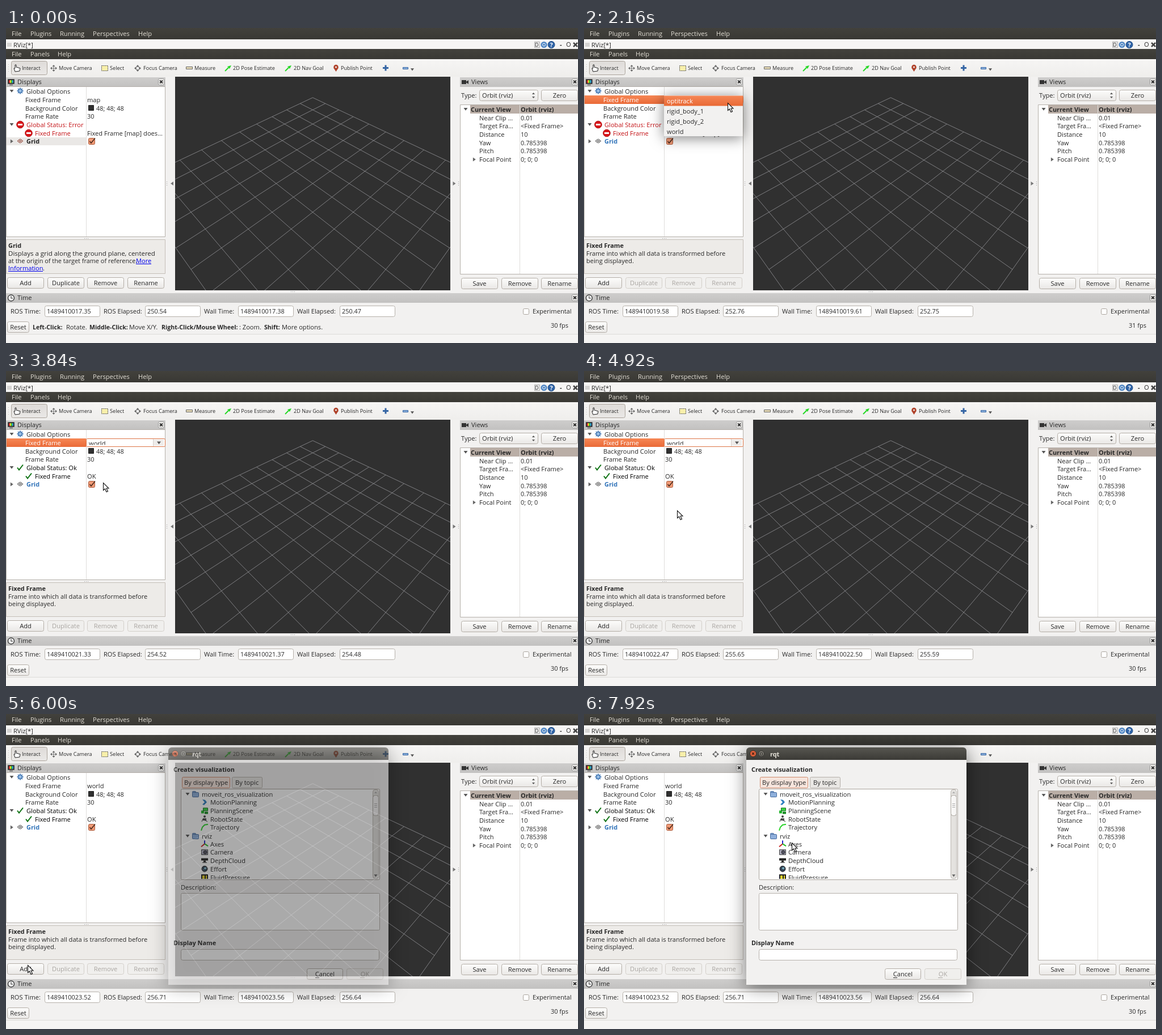
An HTML page with a canvas that plays this animation: 1008x556 px, repeating every 8 s.

```html
<!DOCTYPE html>
<html lang="en">
<head>
<meta charset="utf-8">
<title>RViz fixed frame</title>
<style>
html, body { margin: 0; width: 100%; height: 100%; overflow: hidden; background: #f2f1f0; }
canvas { display: block; }
</style>
</head>
<body>
<canvas id="stage" width="1008" height="556"></canvas>
<script>
const LOOP = 8000, STEP = 120;
const SELECT = 1080, POPUP = 1920, PICK = 3600, STATUS_OK = 3720, ADD = 5760, DIALOG = 6000;
const FAMILY = '"Open Sans", "Noto Sans", sans-serif';
const REG = `11.1px ${FAMILY}`, BOLD = `bold 10.9px ${FAMILY}`, HINT = `bold 10.6px ${FAMILY}`;
const SLIM = `10.9px ${FAMILY}`, SMALL = `9.15px ${FAMILY}`, NOTE = `11.5px ${FAMILY}`;
const INK = '#282828', PANEL = '#f2f1f0', EDGE = '#b5b0aa', BLUE = '#3465a4';

const stage = document.getElementById('stage').getContext('2d');
let g = stage;

// time, x, y of the pointer tip
const POINTER = [
  [120, 916, 320], [840, 200, 200], [1200, 155, 127], [1440, 155, 127], [1800, 269, 126],
  [2040, 269, 126], [2520, 205, 148], [3000, 184, 169], [3360, 176, 179], [3600, 174, 180],
  [4320, 165, 232], [4920, 164, 246], [5520, 38, 443], [6120, 38, 443], [6720, 385, 143],
  [6960, 387, 147], [7200, 396, 168], [7680, 374, 213], [7920, 366, 227]
];
// time, ROS time, ROS elapsed, wall time, wall elapsed (seconds)
const CLOCK = [
  [0, 17.35, 250.54, 17.38, 250.47], [1320, 18.71, 251.89, 18.74, 251.89],
  [3000, 20.45, 253.64, 20.49, 253.61], [4920, 22.47, 255.65, 22.50, 255.59],
  [6000, 23.52, 256.71, 23.56, 256.64]
];

function sample(keys, t) {
  const next = keys.findIndex(k => k[0] > t);
  if (next < 0) return keys.at(-1).slice(1);
  if (next === 0) return keys[0].slice(1);
  const a = keys[next - 1], b = keys[next], p = (t - a[0]) / (b[0] - a[0]);
  return a.slice(1).map((v, i) => v + (b[i + 1] - v) * p);
}

function text(s, x, y, color = INK, font = REG) {
  g.fillStyle = color;
  g.font = font;
  g.fillText(s, x, y);
}

function rect(x, y, w, h, fill) {
  g.fillStyle = fill;
  g.fillRect(x, y, w, h);
}

function shade(y, h, top, bottom) {
  const paint = g.createLinearGradient(0, y, 0, y + h);
  paint.addColorStop(0, top);
  paint.addColorStop(1, bottom);
  return paint;
}

function box(x, y, w, h, fill = '#fff', edge = EDGE, radius = 0) {
  g.beginPath();
  g.roundRect(x + .5, y + .5, w - 1, h - 1, radius);
  g.fillStyle = fill;
  g.fill();
  g.strokeStyle = edge;
  g.lineWidth = 1;
  g.stroke();
}

function poly(points, fill, stroke, width = 1) {
  g.beginPath();
  for (let i = 0; i < points.length; i += 2) g.lineTo(points[i], points[i + 1]);
  if (fill) { g.closePath(); g.fillStyle = fill; g.fill(); }
  if (stroke) { g.strokeStyle = stroke; g.lineWidth = width; g.stroke(); }
}

function disc(x, y, r, fill, stroke, width = 1) {
  g.beginPath();
  g.arc(x, y, r, 0, 7);
  if (fill) { g.fillStyle = fill; g.fill(); }
  if (stroke) { g.strokeStyle = stroke; g.lineWidth = width; g.stroke(); }
}

function button(label, x, y, w, h = 20, enabled = true) {
  box(x, y, w, h, enabled ? shade(y, h, '#fdfdfc', '#e9e7e5') : '#f0efed', enabled ? '#b3ada6' : '#d3cfca', 3);
  g.textAlign = 'center';
  text(label, x + w / 2, y + h / 2 + 4, enabled ? INK : '#aaa6a2');
  g.textAlign = 'left';
}

function down(x, y, s = 3.5, color = '#555') { poly([x - s, y - s * .6, x + s, y - s * .6, x, y + s * .8], color); }
function right(x, y, s = 3.5, color = '#666') { poly([x - s * .6, y - s, x - s * .6, y + s, x + s * .8, y], color); }
function check(x, y) { poly([x - 5, y, x - 2, y + 4, x + 5, y - 5], null, '#0f7314', 2); }

function closeBox(x, y) {
  box(x - 5, y - 6, 11, 12, '#efeeec', '#999', 2);
  poly([x - 2, y - 2.5, x + 3, y + 2.5], null, '#333', 2);
  poly([x + 3, y - 2.5, x - 2, y + 2.5], null, '#333', 2);
}

function header(label, x, y, w, textX) {
  rect(x, y, w, 17, shade(y, 17, '#cecdcc', '#c2c1c0'));
  text(label, textX, y + 12);
}

function menu(y, h, baseline, items) {
  rect(0, y, 1008, h, shade(y, h, '#42413c', '#393834'));
  for (const [label, x] of items) text(label, x, baseline, '#e3dfd6');
}

function crossArrows(x, y) {
  poly([x - 5, y, x + 5, y], null, '#777');
  poly([x, y - 5, x, y + 5], null, '#777');
  for (const d of [-1, 1]) {
    poly([x + 6 * d, y, x + 3 * d, y - 2.5, x + 3 * d, y + 2.5], '#666');
    poly([x, y + 6 * d, x - 2.5, y + 3 * d, x + 2.5, y + 3 * d], '#666');
  }
}

function toolbar() {
  rect(0, 55, 1008, 31, shade(55, 31, '#f6f5f4', '#efeeec'));
  for (let y = 64; y < 78; y += 4) rect(4, y, 1, 1, '#bbb');
  box(9, 58, 64, 25, shade(58, 25, '#dedbd8', '#ebe9e7'), '#aaa39b', 3);
  poly([14, 71, 16, 71, 16, 65, 18, 65, 18, 69, 25, 71, 24, 76, 16, 77, 14, 71], '#fff', '#222');
  crossArrows(84, 71);
  g.setLineDash([2, 1]);
  box(168, 66, 12, 10, '#f8efaa', '#555');
  g.setLineDash([]);
  crossArrows(232, 71);
  disc(232, 71, 3, '#f2f1f0', '#777');
  box(317, 68, 12, 5, '#e5d9b5', '#666');
  for (const x of [386, 492]) {
    poly([x, 76, x + 6, 70], null, '#25d825', 2);
    poly([x + 11, 66, x + 4, 68, x + 8, 72], '#25d825');
  }
  poly([577, 70, 586, 70, 581.5, 77], '#b0432b');
  disc(581.5, 69, 4.2, '#b0432b');
  disc(581.5, 69, 1.5, '#eee');
  rect(664, 69, 10, 3, BLUE);
  rect(667.5, 65.5, 3, 10, BLUE);
  box(699, 69, 10, 4, '#8fb2dc', BLUE);
  down(716, 73, 3);
  const labels = [['Interact', 28], ['Move Camera', 93], ['Select', 183], ['Focus Camera', 242], ['Measure', 332],
    ['2D Pose Estimate', 400], ['2D Nav Goal', 507], ['Publish Point', 590]];
  for (const [label, x] of labels) text(label, x, 74, INK, SMALL);
}

function windowBars() {
  menu(0, 20, 14, [['File', 10], ['Plugins', 43], ['Running', 95], ['Perspectives', 153], ['Help', 233]]);
  rect(0, 20, 1008, 17, '#f6f5f4');
  rect(2, 26, 8, 7, '#d5d4d3');
  text('RViz[*]', 13, 33.5);
  box(931, 24, 10, 11, '#eee', '#aaa');
  text('D', 932, 33, INK, SMALL);
  disc(948, 29.5, 5.5, '#4f86c4');
  disc(948, 29.5, 2.5, null, '#fff');
  disc(961, 29.5, 6, '#2f64a8', '#1f4a80');
  text('?', 958.5, 33.5, '#fff', BOLD);
  text('-', 976, 33, INK, BOLD);
  text('O', 987, 33);
  poly([1000, 26, 1007, 33], null, '#444', 2.5);
  poly([1007, 26, 1000, 33], null, '#444', 2.5);
  menu(37, 18, 50, [['File', 10], ['Panels', 43], ['Help', 91]]);
  toolbar();
}

function view3d() {
  g.save();
  g.beginPath();
  g.rect(298, 86, 485, 377);
  g.clip();
  rect(298, 86, 485, 377, '#303030');
  const project = (i, j) => {
    const away = (i + j) / 2, scale = 455 / (10 + away);
    return [540.5 + (i - j) * Math.SQRT1_2 * scale, 274.5 - away * scale];
  };
  for (let i = -5; i <= 5; i++) {
    poly([...project(i, -5), ...project(i, 5)], null, 'rgba(160,160,164,.7)');
    poly([...project(-5, i), ...project(5, i)], null, 'rgba(160,160,164,.7)');
  }
  g.restore();
  poly([290, 274.5, 295, 271, 295, 278], '#777');
  poly([792.5, 274.5, 787.5, 271, 787.5, 278], '#777');
  for (let i = 0; i < 3; i++) {
    rect(283, 271 + i * 3, 1, 1, '#999');
    rect(797, 271 + i * 3, 1, 1, '#999');
    rect(138 + i * 3, 371, 1, 1, '#999');
    rect(502 + i * 3, 465, 1, 1, '#999');
  }
}

function statusIcon(x, y, ok) {
  if (ok) return check(x, y);
  disc(x, y, 6.3, '#d8181c', '#b01014');
  rect(x - 4, y - 1.5, 8, 3, '#fff');
}

function displays(t) {
  const picked = t >= SELECT, editing = picked && t < ADD, ok = t >= STATUS_OK;
  const frame = t < PICK ? 'map' : 'world', statusInk = ok ? '#000' : '#c41216';
  header('Displays', 0, 87, 281, 20);
  box(3, 90, 12, 9, '#222', '#555');
  ['#d33', '#dd3', '#3b3', '#39d'].forEach((c, i) => rect(5 + i * 2, 92, 2, 5, c));
  rect(6, 100, 6, 1, '#333');
  closeBox(273, 95);
  box(0, 103, 281, 266);
  if (!picked) rect(1, 193, 140, 14, '#eae8e6');
  rect(141, 104, 1, 264, '#dedddb');

  down(10, 111);
  for (let i = 0; i < 4; i++) {
    const a = i * Math.PI / 4, x = Math.cos(a) * 5.5, y = Math.sin(a) * 5.5;
    poly([25 - x, 111 - y, 25 + x, 111 + y], null, '#4d7fb8', 2);
  }
  disc(25, 111, 3.2, '#9cc0e6', '#4d7fb8', 1.5);
  text('Global Options', 36, 115.5);
  if (editing) rect(1, 119, 140, 15, shade(119, 15, '#f68755', '#ea6a38'));
  text('Fixed Frame', 34, 130.5, editing ? '#fff' : INK);
  if (editing) {
    box(141, 119, 140, 15, '#fff', '#dc7446', 2);
    g.save();
    g.beginPath();
    g.rect(143, 121, 117, 9.5);
    g.clip();
    text(frame, 146, 131.5);
    if (t < PICK && (t / 500 | 0) % 2 === 0) rect(169, 121, 1, 11, INK);
    g.restore();
    rect(260, 121, 18, 11, '#eeecea');
    rect(259, 120, 1, 13, '#d5d0cb');
    down(269.5, 126.5);
  } else text(frame, 143, 130.5);
  text('Background Color', 34, 145.5);
  box(145, 136, 10, 10, '#303030', '#222');
  text('48; 48; 48', 159, 145.5, INK, SLIM);
  text('Frame Rate', 34, 160);
  text('30', 143, 160, INK, SLIM);

  down(10, 170);
  statusIcon(25, 170.5, ok);
  text('Global Status: ' + (ok ? 'Ok' : 'Error'), 36, 174.5, statusInk);
  statusIcon(40, 185.5, ok);
  text('Fixed Frame', 51, 189.5, statusInk);
  text(ok ? 'OK' : 'Fixed Frame [map] does…', 143, 189.5);
  right(10, 200);
  const mesh = picked ? '#444' : '#8c3a2a';
  poly([20, 199.5, 25, 196, 30, 199.5, 25, 203, 20, 199.5], null, mesh);
  poly([22.5, 197.7, 27.5, 201.3], null, mesh);
  poly([27.5, 197.7, 22.5, 201.3], null, mesh);
  text('Grid', 36, 204, picked ? '#2f72b8' : '#222', BOLD);
  box(145, 194, 12, 12, '#f09a76', '#a8593a', 2);
  poly([147.5, 200, 150, 203, 157, 194.5], null, '#4a2a1c', 1.6);

  box(0, 373, 281, 61, '#edebe8', '#c4beb7');
  if (picked) {
    text('Fixed Frame', 4, 388, INK, BOLD);
    text('Frame into which all data is transformed before', 4, 401.5);
    text('being displayed.', 4, 415);
  } else {
    text('Grid', 4, 388, INK, BOLD);
    text('Displays a grid along the ground plane, centered', 4, 401.5, INK, NOTE);
    text('at the origin of the target frame of reference.', 4, 415, INK, SLIM);
    text('More', 229, 415, '#00e');
    text('Information', 4, 428, '#00e');
    text('.', 65, 428);
    rect(229, 416, 27, 1, '#00e');
    rect(4, 429, 61, 1, '#00e');
  }
  button('Add', 2, 440, 65);
  button('Duplicate', 73, 440, 65, 20, !picked);
  button('Remove', 143, 440, 65, 20, !picked);
  button('Rename', 214, 440, 65, 20, !picked);
}

function views() {
  header('Views', 800, 87, 208, 820);
  rect(803, 92, 8, 7, '#333');
  poly([810, 95.5, 815, 92, 815, 99], '#333');
  closeBox(1002, 95);
  text('Type:', 802, 123);
  button('', 834, 109, 104);
  text('Orbit (rviz)', 839, 123);
  poly([927, 117, 932, 117, 929.5, 114], '#555');
  poly([927, 121, 932, 121, 929.5, 124], '#555');
  button('Zero', 943, 109, 65);
  box(800, 135, 209, 300);
  rect(818, 136, 190, 15, '#baaea6');
  rect(905, 136, 1, 298, '#dedddb');
  down(810, 143);
  text('Current View', 819, 147.5, INK, BOLD);
  text('Orbit (rviz)', 907, 147.5, INK, BOLD);
  const rows = [['Near Clip …', '0.01'], ['Target Fra…', '<Fixed Frame>'], ['Distance', '10'],
    ['Yaw', '0.785398'], ['Pitch', '0.785398'], ['Focal Point', '0; 0; 0']];
  rows.forEach(([label, value], i) => {
    const y = 162.5 + i * 14.7;
    text(label, 834, y);
    text(value, 907, y, INK, i === 1 ? REG : SLIM);
  });
  right(825, 232);
  button('Save', 802, 441, 65);
  button('Remove', 873, 441, 65);
  button('Rename', 943, 441, 65);
}

function timePanel(t) {
  header('Time', 0, 468, 1008, 20);
  disc(9, 476.5, 5.5, '#eee', '#333', 1.3);
  poly([9, 473, 9, 477, 12, 477], null, '#333');
  closeBox(1002, 476);
  const fields = [['ROS Time:', 8, 68], ['ROS Elapsed:', 172, 245], ['Wall Time:', 349, 409], ['Wall Elapsed:', 513, 588]];
  const values = sample(CLOCK, t);
  fields.forEach(([label, x, fieldX], i) => {
    text(label, x, 503.5);
    box(fieldX, 490, 98, 20, '#fff', EDGE, 3);
    text((i % 2 ? '' : '14894100') + values[i].toFixed(2), fieldX + 4, 503.5, INK, SLIM);
  });
  box(911, 495, 11, 11, '#fff', '#a9a39c', 2);
  text('Experimental', 928, 503.5);
  button('Reset', 2, 518, 39);
  text((t >= 2160 && t < 2760 ? 31 : 30) + ' fps', 960, 528.5, INK, SLIM);
  if (t < 720) {
    const hints = [['Left-Click:', 47, 'Rotate.', 106], ['Middle-Click:', 147, 'Move X/Y.', 217],
      ['Right-Click/Mouse Wheel:', 274, ': Zoom.', 411], ['Shift:', 455, 'More options.', 486]];
    for (const [key, x, action, actionX] of hints) {
      text(key, x, 532, INK, HINT);
      text(action, actionX, 532);
    }
  }
  rect(0, 540, 1008, 1, '#dddbd8');
  rect(0, 541, 1008, 15, '#f5f4f3');
}

function popup(y) {
  g.save();
  g.shadowColor = 'rgba(0,0,0,.5)';
  g.shadowBlur = 24;
  g.shadowOffsetY = 3;
  rect(141, 119, 139, 72, PANEL);
  g.restore();
  const active = Math.min(3, Math.floor((y - 119) / 18));
  ['optitrack', 'rigid_body_1', 'rigid_body_2', 'world'].forEach((name, i) => {
    const top = 119.5 + i * 18;
    if (i === active) rect(141, top, 139, 18, shade(top, 18, '#f58655', '#e96935'));
    text(name, 146, top + 13, i === active ? '#fff' : INK);
  });
}

const ICONS = [
  (x, y) => poly([x - 4, y - 5, x + 1, y - 4, x + 4, y, x - 1, y + 5, x - 4, y + 4, x, y], '#2f7fc0'),
  (x, y) => { rect(x - 6, y, 5, 5, '#1fb52a'); box(x - 3, y - 5, 9, 6, '#39d545', '#126b18'); rect(x, y + 2, 6, 4, '#148a1e'); },
  (x, y) => { disc(x, y - 4, 2, '#444'); rect(x - 3, y - 1, 6, 4, '#555'); poly([x - 5, y + 5, x - 3, y, x + 5, y + 5], null, '#333'); },
  (x, y) => poly([x - 6, y + 6, x - 4, y, x, y - 4, x + 6, y - 5], null, '#2bd52b', 2),
  (x, y) => { poly([x, y, x, y - 6], null, '#22c', 2); poly([x, y, x - 6, y + 5], null, '#c22', 2); poly([x, y, x + 6, y + 4], null, '#2b2', 2); },
  (x, y) => { box(x - 6, y - 5, 12, 10, '#aab', '#444'); disc(x + 1, y, 3, '#556', '#222'); },
  (x, y) => { rect(x - 6, y - 4, 12, 4, '#222'); rect(x - 2, y, 4, 3, '#222'); rect(x - 4, y + 3, 8, 1, '#222'); },
  (x, y) => { disc(x, y, 5, '#345', '#222'); disc(x + 1, y - 1, 2, '#7ab'); },
  (x, y) => { rect(x - 6, y - 5, 12, 10, '#222'); rect(x - 4, y - 3, 4, 8, '#e8d52a'); rect(x + 2, y - 3, 2, 8, '#e8d52a'); }
];

function folder(name, y) {
  down(320, y);
  box(328, y - 5, 7, 4, '#8fb0dc', '#456a9c', 1);
  box(328, y - 3, 12, 9, '#8fb0dc', '#456a9c', 1);
  text(name, 345, y + 4.5);
}

function dialog() {
  g.beginPath();
  g.roundRect(286, 59, 388, 419, [6, 6, 0, 0]);
  g.clip();
  rect(286, 59, 388, 22, shade(59, 22, '#575650', '#3b3a36'));
  rect(286, 81, 388, 397, PANEL);
  disc(298, 70, 5.5, '#e5623a', '#3a2a22');
  poly([296, 68, 300, 72], null, '#4a2216', 1.5);
  poly([300, 68, 296, 72], null, '#4a2216', 1.5);
  disc(312.5, 70, 5, '#7b7972', '#33322e');
  box(310, 68, 5, 5, '#7b7972', '#33322e');
  text('rqt', 328, 74.5, '#e6e2d9', BOLD);
  text('Create visualization', 295, 102, INK, BOLD);
  box(310, 111, 85, 20, '#f6e5dd', '#d08a6c', 2);
  text('By display type', 314, 124.5);
  box(398, 111, 54, 20, '#e9e7e4', EDGE, 2);
  text('By topic', 404, 125);

  box(308, 132, 351, 161, '#fff', '#aaa49d', 2);
  g.save();
  g.beginPath();
  g.rect(309, 133, 337, 158);
  g.clip();
  folder('moveit_ros_visualization', 141);
  folder('rviz', 215);
  const names = ['MotionPlanning', 'PlanningScene', 'RobotState', 'Trajectory', 'Axes', 'Camera', 'DepthCloud', 'Effort', 'FluidPressure'];
  names.forEach((name, i) => {
    const y = 141 + (i + (i < 4 ? 1 : 2)) * 14.7;
    ICONS[i](350, y);
    text(name, 360, y + 4.5);
  });
  g.restore();
  box(646, 133, 11, 158, '#e4e2df', '#bdb8b2', 4);
  box(646, 143, 11, 37, '#f7f6f5', '#a9a49d', 4);
  for (const y of [158, 161, 164]) rect(649, y, 5, 1, '#aaa');
  poly([649, 140, 654, 140, 651.5, 137], '#aaa');
  down(651.5, 285, 3, '#666');

  text('Description:', 308, 309.5);
  box(308, 316, 351, 66, '#fff', EDGE, 2);
  text('Display Name', 295, 408, INK, BOLD);
  box(308, 415, 350, 20, '#fff', EDGE, 3);
  button('Cancel', 530, 449, 64);
  rect(545, 465, 7, 1, INK);
  button('OK', 600, 449, 65, 20, false);
  rect(624, 465, 8, 1, '#aaa6a2');
}

function layer(draw) {
  const canvas = document.createElement('canvas');
  canvas.width = 1008;
  canvas.height = 556;
  g = canvas.getContext('2d');
  draw();
  g = stage;
  return canvas;
}

function pointer(t, x, y) {
  if (t >= 1080 && t < 1680 && y < 134) {
    for (const [color, width] of [['#fff', 3], ['#111', 1.3]]) {
      poly([x + .5, y - 6, x + .5, y + 6], null, color, width);
      poly([x - 2.5, y - 6, x + 3.5, y - 6], null, color, width);
      poly([x - 2.5, y + 6, x + 3.5, y + 6], null, color, width);
    }
    return;
  }
  const arrow = [0, 0, 0, 13, 3, 10.5, 5.5, 16, 8, 15, 5.5, 9.5, 9.5, 9.5];
  poly([...arrow, 0, 0].map((v, i) => v + (i % 2 ? y : x) + .5), '#fff', '#111', 1.1);
}

const chrome = layer(() => {
  rect(0, 0, 1008, 556, PANEL);
  windowBars();
  view3d();
  views();
});
const dialogLayer = layer(dialog);

function draw(now) {
  const t = Math.floor(now % LOOP / STEP) * STEP;
  const [x, y] = sample(POINTER, t).map(Math.round);
  g.drawImage(chrome, 0, 0);
  displays(t);
  timePanel(t);
  if (t >= POPUP && t < PICK) popup(y);
  if (t >= DIALOG) {
    g.save();
    g.globalAlpha = Math.min(1, .62 + (t - DIALOG) / 300);
    g.shadowColor = 'rgba(0,0,0,.5)';
    g.shadowBlur = 32;
    g.shadowOffsetY = 4;
    g.drawImage(dialogLayer, 0, 0);
    g.restore();
  }
  if (t > 0) pointer(t, x, y);
  requestAnimationFrame(draw);
}
requestAnimationFrame(draw);
</script>
</body>
</html>
```
